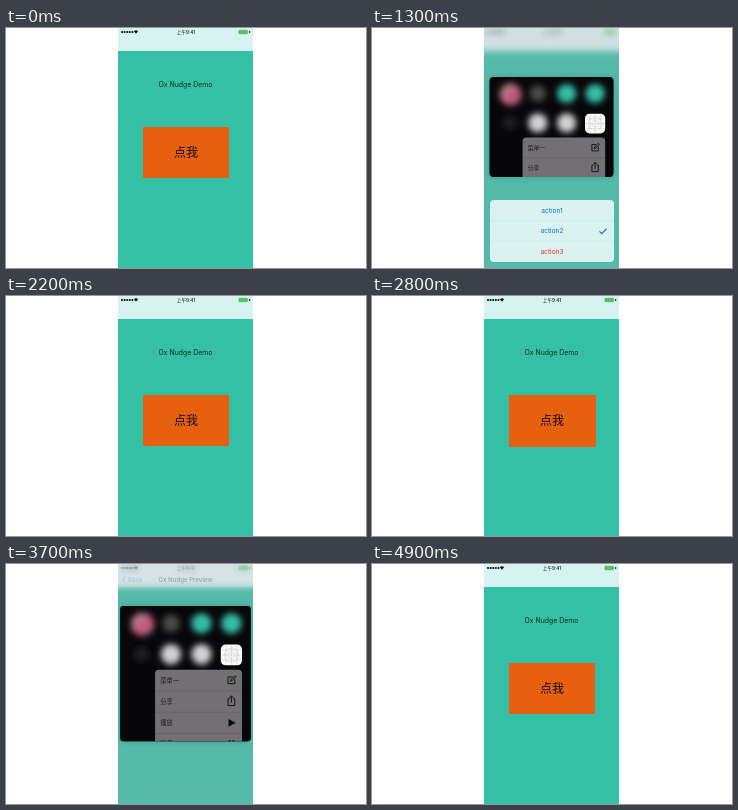
Write an HTML page that moves like this. It is 360 px wide and 240 px high and loops after 5000 ms.

```html
<!DOCTYPE html>
<html lang="zh">
<head>
<meta charset="utf-8">
<title>Press preview</title>
<style>
html, body { margin: 0; width: 100%; height: 100%; overflow: hidden; background: #fff; }
body { position: relative; font-family: Inter, "Noto Sans CJK SC", "Noto Sans CJK", sans-serif; }
svg { position: absolute; left: 0; top: 0; overflow: visible; }
.phone { position: absolute; left: 112px; top: 0; width: 135px; height: 240px; overflow: hidden; background: #34c0a5; }
.phone > div { position: absolute; }
.phone > *, .nav *, .home * { animation-duration: 5s; animation-iteration-count: infinite; animation-timing-function: ease-in-out; }

.home { inset: 0; animation-name: blur; }
.home::before { content: ""; position: absolute; inset: -20px; background: linear-gradient(#d6f3f1 43px, #34c0a5 43px); }
.head { animation-name: parallax; }
.dim { inset: 0; background: rgba(186, 166, 178, .25); animation-name: dim; }
.button { left: 24.5px; top: 99px; width: 86px; height: 50.5px; background: #e66010; animation-name: button; }
.card { left: 0; top: 0; width: 135px; height: 108.5px; overflow: hidden; border-radius: 4.5px; background: #070709;
  transform-origin: 50% 0; box-shadow: 0 0 7px rgba(0, 50, 45, .22); animation-name: card; }
.chevron { animation-name: chevron; }
.sheet { left: 5.5px; top: 172px; width: 124px; height: 62px; border-radius: 4px; background: #daf3f1; animation-name: sheet; }
.nav { left: 0; top: 0; width: 135px; height: 23px; background: #e3eced; animation-name: nav; }
.back { animation-name: label; }
.heading { animation-name: label, heading; }

@keyframes blur {
  0%, 4% { filter: blur(0); }
  10%, 33% { filter: blur(3px); }
  38%, 56% { filter: blur(0); }
  63%, 76.9% { filter: blur(3px); }
  77%, 100% { filter: blur(0); }
}
@keyframes dim {
  0%, 4% { opacity: 0; }
  11%, 33% { opacity: 1; }
  38%, 56% { opacity: 0; }
  64%, 76.9% { opacity: 1; }
  77%, 100% { opacity: 0; }
}
@keyframes parallax {
  0%, 77% { transform: none; }
  77.1%, 84% { transform: translateX(-40px); }
  93%, 100% { transform: none; }
}
@keyframes button {
  0%, 4% { opacity: 1; transform: none; }
  9% { opacity: 1; transform: scale(1.03); }
  11%, 35.5% { opacity: 0; transform: none; }
  37.5%, 56% { opacity: 1; transform: none; }
  62% { opacity: 1; transform: scale(1.03); }
  64%, 77% { opacity: 0; transform: none; }
  77.1%, 84% { opacity: 1; transform: translateX(-40px); }
  93%, 100% { opacity: 1; transform: none; }
}
@keyframes card {
  0%, 9% { opacity: 0; height: 78px; transform: translateY(99px) scale(.64); }
  10.5% { opacity: 1; }
  13% { opacity: 1; height: 108.5px; transform: translateY(60px) scale(.918); }
  16%, 19% { opacity: 1; height: 108.5px; transform: translateY(64px) scale(.956); }
  25.5%, 33% { opacity: 1; height: 108.5px; transform: translateY(49px) scale(.918); }
  36% { opacity: 1; }
  38%, 61.9% { opacity: 0; height: 78px; transform: translateY(99px) scale(.64); }
  63.5% { opacity: 1; }
  66%, 69% { opacity: 1; height: 108.5px; transform: translateY(56.5px) scale(.918); border-radius: 4.5px; }
  72.5% { opacity: 1; height: 108.5px; transform: translateY(55px) scale(.956); border-radius: 4.5px; }
  77%, 84% { opacity: 1; height: 240px; transform: none; border-radius: 0; }
  93% { opacity: 1; height: 240px; transform: translateX(136px); border-radius: 0; }
  93.1%, 100% { opacity: 0; height: 78px; transform: translateY(99px) scale(.64); }
}
@keyframes chevron {
  0%, 13% { opacity: 0; transform: none; }
  15.5%, 19% { opacity: 1; transform: none; }
  24%, 100% { opacity: 0; transform: translateY(-14px); }
}
@keyframes sheet {
  0%, 19% { transform: translateY(72px); }
  25.5%, 33% { transform: none; }
  37%, 100% { transform: translateY(72px); }
}
@keyframes nav {
  0%, 72.5% { opacity: 0; }
  77%, 84% { opacity: 1; background: #e3eced; }
  93% { opacity: 1; background: #d6f3f1; }
  93.1%, 100% { opacity: 0; background: #d6f3f1; }
}
@keyframes label {
  0%, 84% { opacity: 1; }
  91%, 100% { opacity: 0; }
}
@keyframes heading {
  0%, 84% { transform: none; }
  93%, 100% { transform: translateX(62px); }
}
</style>
</head>
<body>
<div class="phone">
  <div class="home">
    <svg width="135" height="240">
      <defs>
        <g id="status">
          <g fill="#111">
            <circle cx="4" cy="4" r="1.1"/><circle cx="6.6" cy="4" r="1.1"/><circle cx="9.2" cy="4" r="1.1"/><circle cx="11.8" cy="4" r="1.1"/><circle cx="14.4" cy="4" r="1.1"/>
            <path d="M18 5.8l-2.1-2.5a3 3 0 0 1 4.2 0z"/>
            <text x="68" y="5.7" font-size="4.6" font-weight="500" text-anchor="middle">上午9:41</text>
            <rect x="131.2" y="3" width="1" height="2"/>
          </g>
          <rect x="120.8" y="2.2" width="8.8" height="3.6" rx=".8" fill="#4cc95a" stroke="#3a8f48" stroke-width=".4"/>
        </g>
      </defs>
      <use href="#status"/>
      <text class="head" x="67.5" y="58.7" font-size="6.9" text-anchor="middle" fill="#0d2b26">Ox Nudge Demo</text>
    </svg>
  </div>
  <div class="dim"></div>
  <div class="button">
    <svg width="86" height="50"><text x="43" y="29.6" font-size="12" text-anchor="middle" fill="#140a04">点我</text></svg>
  </div>
  <svg class="chevron" width="135" height="240">
    <path d="M62 58.4L67.5 55.8L73 58.4" fill="none" stroke="#fff" stroke-width="1.8" stroke-linecap="round" stroke-linejoin="round"/>
  </svg>

  <div class="card">
    <svg width="135" height="240">
      <defs>
        <filter id="soft" x="-50%" y="-50%" width="200%" height="200%"><feGaussianBlur stdDeviation="3.2"/></filter>
        <linearGradient id="warm" x1="0" y1="0" x2="1" y2="1">
          <stop offset="0" stop-color="#b89a5a"/><stop offset=".4" stop-color="#b56a92"/>
          <stop offset=".65" stop-color="#d0506a"/><stop offset="1" stop-color="#4f8fa8"/>
        </linearGradient>
        <linearGradient id="dock" x1="0" y1="0" x2="0" y2="1">
          <stop offset="0" stop-color="#1a1a1c"/><stop offset=".2" stop-color="#3b3b3d"/><stop offset="1" stop-color="#303034"/>
        </linearGradient>
      </defs>
      <rect width="135" height="240" fill="#070709"/>
      <g filter="url(#soft)">
        <circle cx="23" cy="19" r="12" fill="url(#warm)"/>
        <circle cx="52.5" cy="18" r="9" fill="#4b4949"/>
        <circle cx="84" cy="18" r="10.5" fill="#36bda5"/>
        <circle cx="115" cy="18" r="10.5" fill="#36bda5"/>
        <circle cx="22" cy="50" r="8" fill="#1d1c21"/>
        <circle cx="52.5" cy="50" r="10.5" fill="#d2d0d2"/>
        <circle cx="84" cy="50" r="10.5" fill="#d2d0d2"/>
      </g>
      <rect x="104" y="40" width="22" height="21.5" rx="5" fill="#fafafa"/>
      <g fill="none" stroke="#c3c5c8" stroke-width=".5">
        <path d="M104.5 45.5h21M104.5 50.8h21M104.5 56h21M109.5 40.5v20.5M115 40.5v20.5M120.5 40.5v20.5"/>
        <circle cx="115" cy="50.8" r="7.3"/><circle cx="115" cy="50.8" r="3.6"/>
      </g>

      <rect x="36" y="66" width="90" height="88" rx="4" fill="#727072"/>
      <path d="M36 88h90M36 110h90M36 132h90" stroke="#5a585b" stroke-width=".5"/>
      <g font-size="6.5" fill="#1d1b1e">
        <text x="41.5" y="79.3">菜单一</text><text x="41.5" y="101.3">分享</text>
        <text x="41.5" y="123.3">播放</text><text x="41.5" y="145.3">暂停</text>
      </g>
      <g fill="none" stroke="#111" stroke-width="1">
        <path d="M116 73.5h-4.5v7h7v-4.5M114 78l.5-1.8l4-4l1.2 1.2l-4 4z"/>
        <path d="M113.2 96h-1.7v7h7v-7h-1.7M115 100v-6.6M113 95l2-2l2 2"/>
      </g>
      <path d="M112 117v8l7.5-4zM112 139h2.2v8h-2.2zM116 139h2.2v8h-2.2z" fill="#080808"/>

      <rect y="203" width="135" height="37" fill="url(#dock)"/>
      <circle cx="66" cy="220" r="12" fill="#3b9fe8" filter="url(#soft)"/>
    </svg>
  </div>

  <div class="sheet">
    <svg width="124" height="62">
      <path d="M0 20.7h124M0 41.3h124" stroke="#c2e2e1" stroke-width=".5"/>
      <g font-size="6.6" text-anchor="middle" fill="#0b6fd0">
        <text x="62" y="12.8">action1</text><text x="62" y="33.4">action2</text>
        <text x="62" y="54" fill="#f0282c">action3</text>
      </g>
      <path d="M109.5 31.3l2.3 2.3l4.7-5" fill="none" stroke="#0b6fd0" stroke-width="1.2"/>
    </svg>
  </div>

  <div class="nav">
    <svg width="135" height="23">
      <use href="#status"/>
      <g class="back" fill="#0a78e6">
        <path d="M7.3 12.6L4.6 15.5L7.3 18.4" fill="none" stroke="#0a78e6" stroke-width=".9"/>
        <text x="10" y="17.7" font-size="6.2">Back</text>
      </g>
      <text class="heading" x="67.5" y="17.7" font-size="6.1" font-weight="600" text-anchor="middle" fill="#0a0a0a">Ox Nudge Preview</text>
    </svg>
  </div>
</div>
</body>
</html>
```
